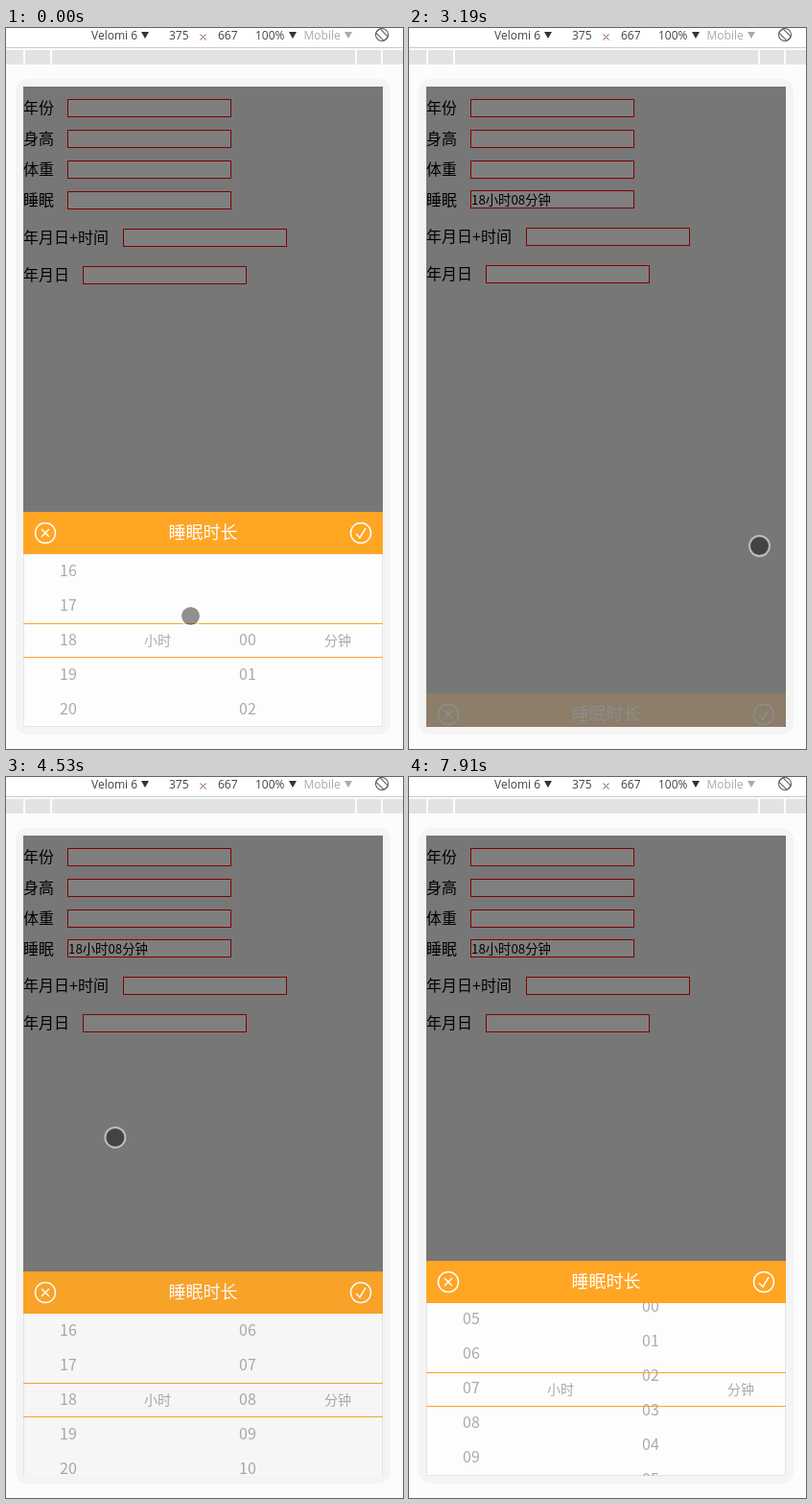
Recreate the animation shown at these times as an HTML page. Size 414x751 px, loop 8000 ms.

```html
<!DOCTYPE html>
<html lang="zh">
<head>
<meta charset="utf-8">
<style>
html, body { margin: 0; width: 100%; height: 100%; overflow: hidden; background: #fcfcfc; }
svg { display: block; }
text { font-family: "Noto Sans CJK SC", "Noto Sans CJK", "Noto Sans", sans-serif; }
.bar text { font: 12px "Open Sans", "Noto Sans", sans-serif; fill: #444; }
.form { font-size: 16px; }
.form rect { fill: #fff; stroke: #f00; }
.num { font: 16px "Liberation Sans", Arial, sans-serif; fill: #aaa; }
.unit { font-size: 14px; fill: #aaa; text-anchor: middle; }
.icon { fill: none; stroke: #fff; stroke-width: 1.5; }
</style>
</head>
<body>
<svg width="414" height="751" viewBox="0 0 414 751">
  <g class="bar">
    <rect width="414" height="20" fill="#fff"/>
    <path d="M0 20.5H414" stroke="#ccc"/>
    <path d="M0 30.5H18M20 30.5H46M48 30.5H364M366 30.5H391M393 30.5H414" stroke="#e3e3e3" stroke-width="15"/>
    <text x="89" y="12">Velomi 6</text>
    <text x="170" y="12">375</text>
    <text x="221" y="12">667</text>
    <text x="260" y="12">100%</text>
    <text x="310.5" y="12" style="fill:#aaa">Mobile</text>
    <path d="M202.5 6.5l6 6m0-6l-6 6" stroke="#855" fill="none"/>
    <path d="M141 4h8l-4 7zM295 4h8l-4 7z" fill="#333"/>
    <path d="M353 4h8l-4 7z" fill="#aaa"/>
    <g fill="none" stroke="#555" transform="translate(392 7) rotate(-45)">
      <circle r="6.5"/>
      <rect x="-3" y="-6" width="6" height="12" rx="1" fill="#fff"/>
    </g>
  </g>
  <rect x="10" y="53" width="391" height="683" rx="13" fill="#f4f4f4"/>
  <svg x="18" y="61" width="375" height="667" viewBox="18 61 375 667">
    <rect x="18" y="61" width="375" height="667" fill="#f0f0f0"/>
    <g class="form">
      <g id="upper"></g>
      <g id="lower"></g>
      <text id="value" x="65" y="184" font-size="13.33">18小时08分钟</text>
    </g>
    <rect id="shade" x="18" y="61" width="375" height="667" opacity=".5"/>
    <g id="panel">
      <rect x="18" y="548" width="375" height="180" fill="#fdfdfd"/>
      <path d="M18.5 548V727.5H392.5V548" stroke="#e6e6e6" fill="none"/>
      <rect x="18" y="504" width="375" height="44" fill="#ffa524"/>
      <text x="205.5" y="532" font-size="18" fill="#fff" text-anchor="middle">睡眠时长</text>
      <g class="icon">
        <circle cx="41" cy="526" r="10.5"/><path d="M37 522l8 8m0-8l-8 8"/>
        <circle cx="370" cy="526" r="10.5"/><path d="M365 527l4 4l6-10"/>
      </g>
      <svg x="18" y="548" width="375" height="180" viewBox="18 548 375 180">
        <g id="hours" class="num"></g>
        <g id="minutes" class="num"></g>
      </svg>
      <text class="unit" x="158" y="643">小时</text>
      <text class="unit" x="346" y="643">分钟</text>
      <path d="M18 620.5H393M18 655.5H393" stroke="#ffa524"/>
    </g>
  </svg>
  <g id="cursor">
    <circle r="9.5" opacity=".43"/>
    <circle r="10.5" fill="none" stroke="#fff" stroke-width="2" opacity=".5"/>
  </g>
</svg>
<script>
const LOOP = 8000, STEP = LOOP / 56, ROW = 36;
const CONFIRM = 2700, CLOSED = 3225, REOPEN = 4000, OPENED = 4451;
const $ = id => document.getElementById(id);
const add = (id, markup) => $(id).insertAdjacentHTML('beforeend', markup);
const move = (id, x, y) => $(id).setAttribute('transform', `translate(${x} ${y})`);
const ramp = (t, a, b) => Math.min(1, Math.max(0, (t - a) / (b - a)));

// A flick starts fast and settles.
const flick = (t, a, b, rows) => rows * (1 - (1 - ramp(t, a, b)) ** 3);

// Pointer stops: [time, x, y]; y 775 is below the stage.
const stops = [
  [0, 192.5, 612.5], [700, 318, 582], [1150, 306, 688], [1500, 308, 560], [2000, 309.5, 609.5],
  [CONFIRM, 369, 526], [3143, 365.5, 539.5], [4143, 135.5, 179.5],
  [4750, 88, 610], [5143, 88, 775], [5850, 87, 575], [6250, 87, 775], [6714, 86.5, 705.5],
  [7700, 292, 562], [7857, 292, 775]
];

function pointer(t) {
  let [, x, y] = stops[0];
  stops.slice(1).forEach(([end, nx, ny], i) => {
    const u = ramp(t, stops[i][0], end + 0.5), s = u > 0.99 ? 1 : u * u * (3 - 2 * u);
    x += (nx - x) * s;
    y += (ny - y) * s;
  });
  return [x, y];
}

['年份', '身高', '体重', '睡眠', '年月日+时间', '年月日'].forEach((label, i) => {
  const y = 83 + 32 * i + 7 * Math.max(0, i - 3);
  const x = 16.5 + 16 * label.length + (label.includes('+') ? 9.5 - 16 + 16 : 16);
  const left = label.includes('+') ? 122.5 : x;
  add(i > 3 ? 'lower' : 'upper', `<text x="18" y="${y + 6}">${label}</text>`);
  add(i > 2 ? 'lower' : 'upper', `<rect x="${left}" y="${y - 8.5}" width="170" height="18"/>`);
});

for (const [id, x, count] of [['hours', 56, 24], ['minutes', 243, 60]])
  for (let i = 0; i < count; i++)
    add(id, `<text x="${x}" y="${643.3 + i * ROW}">${String(i).padStart(2, '0')}</text>`);

function draw(now) {
  const t = Math.floor(now % LOOP / STEP + 1e-6) * STEP;
  const open = Math.max(1 - ramp(t, CONFIRM, CLOSED), ramp(t, REOPEN, OPENED));
  const filled = t > CONFIRM;
  const hour = 18 - flick(t, 4750, 5289, 4) - flick(t, 5850, 6700, 6.97);
  const minute = flick(t, 1200, 2147, 8) - flick(t, 7720, 8134, 8);
  move('cursor', ...pointer(t));
  move('hours', 0, -Math.round(hour * ROW));
  move('minutes', 0, -Math.round(minute * ROW));
  move('panel', 0, Math.round((1 - open) * 224));
  $('panel').setAttribute('opacity', open);
  $('shade').setAttribute('visibility', open ? 'visible' : 'hidden');
  move('lower', 0, filled ? -1 : 0);
  $('value').setAttribute('visibility', filled ? 'visible' : 'hidden');
  requestAnimationFrame(draw);
}
draw(0);
</script>
</body>
</html>
```
